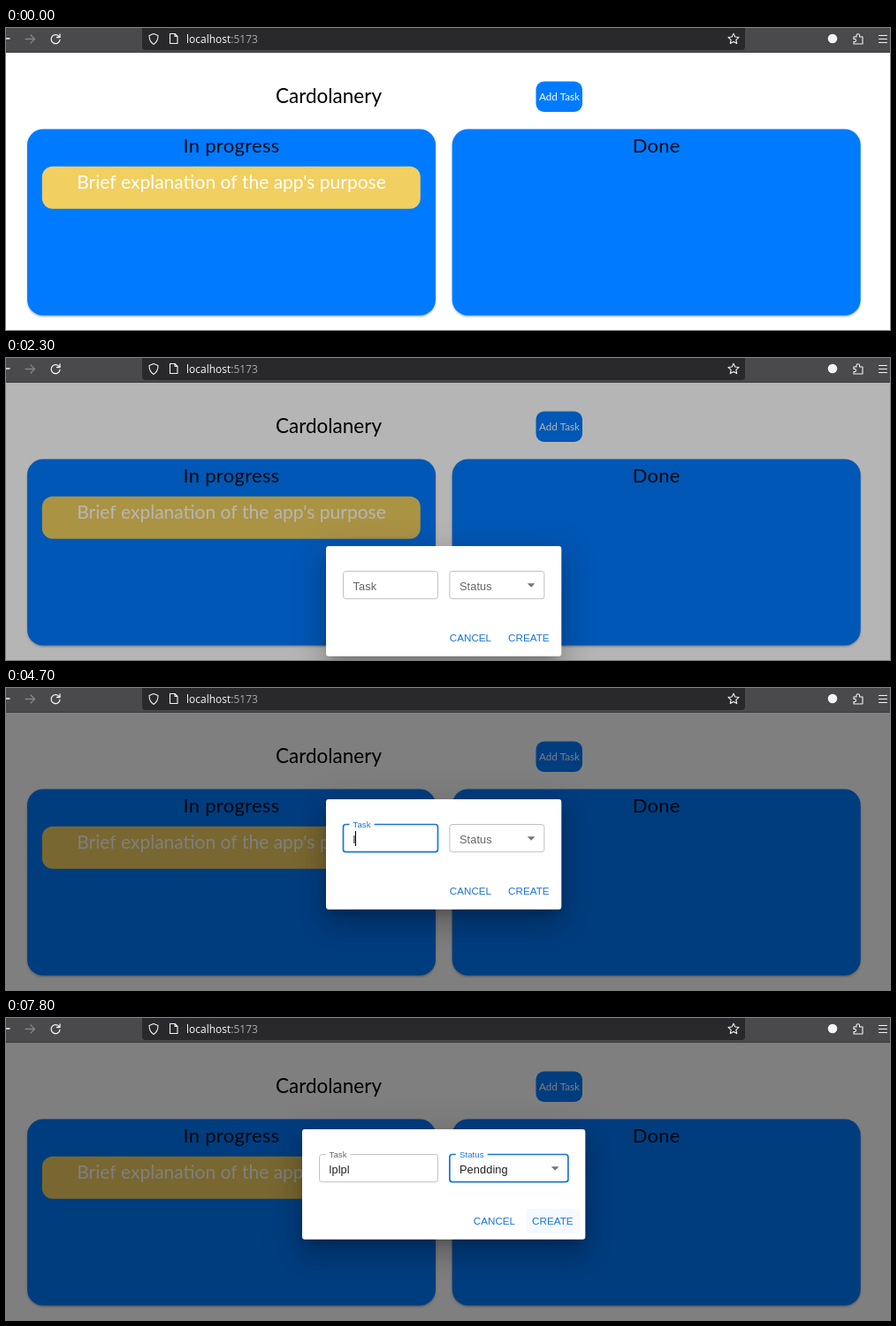
An HTML page with a canvas that plays this animation: 1000 by 342 pixels, repeating every 8000 ms.

```html
<!DOCTYPE html>
<html lang="en">
<head>
<meta charset="utf-8">
<title>Task board</title>
<style>
html, body { margin: 0; width: 100%; height: 100%; overflow: hidden; background: #fff; }
canvas { display: block; }
</style>
</head>
<body>
<canvas id="stage" width="1000" height="342"></canvas>
<script>
const ctx = document.getElementById('stage').getContext('2d');
const LOOP = 8000, STEP = 100;
const SCRIPT = 'Lato, sans-serif';
const UI = '"Liberation Sans", Arial, sans-serif';
const BLUE = '#007bff', ACCENT = '#1976d2', GREY = '#666', INK = '#212121';
const KEY_TIMES = [4700, 4900, 5100, 5200, 5400];
const TYPED = 'lplpl';
const OPTIONS = ['Pendding', 'In progress', 'Done'];

const clamp = v => Math.max(0, Math.min(1, v));
const smooth = v => { v = clamp(v); return v * v * (3 - 2 * v); };
const mix = (a, b, p) => a + (b - a) * p;
const between = (t, a, b) => t >= a && t < b;

function text(str, x, y, size, family, color, align = 'left', spacing = 0) {
  ctx.font = `${size}px ${family}`;
  ctx.letterSpacing = `${spacing}px`;
  ctx.textAlign = align;
  ctx.fillStyle = color;
  ctx.fillText(str, x, y);
}

function box(x, y, w, h, r, color) {
  ctx.fillStyle = color;
  ctx.beginPath();
  ctx.roundRect(x, y, w, h, r);
  ctx.fill();
}

// Each layer is [offset, blur, spread, alpha]; its caster sits off stage so only the shadow shows.
function shadowBox(x, y, w, h, r, color, layers) {
  const away = 2000;
  for (const [dy, blur, spread, alpha] of layers) {
    ctx.save();
    ctx.shadowColor = `rgba(0,0,0,${alpha})`;
    ctx.shadowBlur = blur;
    ctx.shadowOffsetX = away * ctx.getTransform().a;
    ctx.shadowOffsetY = dy;
    box(x - spread - away, y - spread, w + 2 * spread, h + 2 * spread, r, '#000');
    ctx.restore();
  }
  box(x, y, w, h, r, color);
}

function line(path, color, width = 1.3, x = 0, y = 0) {
  ctx.save();
  ctx.translate(x, y);
  ctx.strokeStyle = color;
  ctx.lineWidth = width;
  ctx.lineJoin = ctx.lineCap = 'round';
  ctx.stroke(new Path2D(path));
  ctx.restore();
}

function starPath(r) {
  let d = '';
  for (let i = 0; i < 10; i++) {
    const a = i * Math.PI / 5 - Math.PI / 2, q = i % 2 ? r * 0.48 : r;
    d += `${i ? 'L' : 'M'}${q * Math.cos(a)} ${q * Math.sin(a)}`;
  }
  return d + 'Z';
}

function drawBrowserBar() {
  const light = '#f4f4f6';
  box(0, 0, 1000, 28, 0, '#4a494c');
  box(0, 27, 1000, 1, 0, '#39383b');
  box(154, -6, 682, 31, 4, '#29282b');
  line('M-5 12H4', light);
  line('M22 12.5H32M28 8L32.5 12.5L28 17', '#858487');
  line('M60.3 10A5 5 0 1 0 61 13.5M61 7V10.5H57.5', light);
  line('M167 6.5L172 8.5C172 13 171 16 167 18.5C163 16 162 13 162 8.5Z', light, 1.1);
  line('M185.5 6.5H191L194 9.5V17.5H185.5ZM191 6.5V9.5H194', light, 1.1);
  text('localhost', 204, 17, 12, '"Open Sans", sans-serif', '#fbfbfe');
  text(':5173', 254.3, 17, 12, '"Open Sans", sans-serif', '#aaa9ad');
  line(starPath(6.3), light, 1.1, 823, 12.5);
  ctx.fillStyle = light;
  ctx.beginPath();
  ctx.arc(935, 12, 5.3, 0, 7);
  ctx.fill();
  line('M959 10H962V8.5A1.8 1.8 0 0 1 965.6 8.5V10H969V18H959V15.5H960.5A1.6 1.6 0 0 0 960.5 12.5H959Z', light, 1.1);
  line('M987.5 8.5H996.5M987.5 12.5H996.5M987.5 16.5H996.5', light, 1);
}

function drawColumn(x, title) {
  shadowBox(x, 114.5, 462, 211, 18, BLUE, [[1.5, 2.5, 0, 0.28]]);
  text(title, x + 231, 141, 22, SCRIPT, '#050a12', 'center', 0.3);
}

function drawBoard() {
  box(0, 28, 1000, 314, 0, '#fff');
  text('Cardolanery', 365, 84.5, 22.5, SCRIPT, '#000', 'center');
  box(599.5, 60.5, 52.5, 34.5, 9, BLUE);
  text('Add Task', 626, 82, 11.6, SCRIPT, '#fff', 'center');
  drawColumn(24, 'In progress');
  drawColumn(504.7, 'Done');
  box(40.8, 156.8, 428, 48, 12, '#f1cf60');
  text("Brief explanation of the app's purpose", 255, 181.5, 21, SCRIPT, '#fff', 'center');
}

function drawField({ x, y, w, label, value, shrink, focused, hovered }) {
  const size = mix(12.8, 9.6, shrink);
  ctx.beginPath();
  ctx.roundRect(x + 0.5, y + 28.5, w - 1, 31.2, 3);
  ctx.lineWidth = focused ? 1.7 : 1;
  ctx.strokeStyle = focused ? ACCENT : hovered ? INK : '#c1c1c1';
  ctx.stroke();
  if (shrink > 0) {
    ctx.font = `9.6px ${UI}`;
    ctx.letterSpacing = '0.1px';
    const notch = (ctx.measureText(label).width + 8) * shrink;
    box(x + 7.5, y + 27, notch, 4, 0, '#fff');
  }
  text(label, x + 11.5, mix(y + 49.5, y + 32, shrink), size, UI, focused ? ACCENT : GREY, 'left', 0.1);
  text(value, x + 11.5, y + 49.5, 12.8, UI, INK, 'left', 0.1);
}

function drawArrow(x, y, flip) {
  const s = flip ? -1 : 1;
  ctx.fillStyle = '#757575';
  ctx.beginPath();
  ctx.moveTo(x - 4.3, y - 2.2 * s);
  ctx.lineTo(x + 4.3, y - 2.2 * s);
  ctx.lineTo(x, y + 2.2 * s);
  ctx.fill();
}

function drawMenu(t) {
  const grow = smooth((t - 6350) / 225), fade = 1 - clamp((t - 7050) / 200);
  if (t < 6400 || fade <= 0) return;
  const x = 502, y = 186, w = 108, row = 28.8, pad = 6.4;
  ctx.save();
  ctx.globalAlpha = grow * fade;
  ctx.translate(x + w / 2, y);
  ctx.scale(mix(0.75, 1, grow), mix(0.56, 1, grow));
  ctx.translate(-x - w / 2, -y);
  shadowBox(x, y, w, row * 3 + pad * 2, 3, '#fff', [[4, 4, -2, 0.2], [6.4, 8, 0.8, 0.14], [2.4, 11, 1.6, 0.12]]);
  box(x, y + pad, w, row, 0, t < 6800 ? '#e0e0e0' : '#f0f0f0');
  OPTIONS.forEach((name, i) =>
    text(name, x + 12.8, y + pad + row * i + 19, 12.8, UI, INK, 'left', 0.1));
  ctx.restore();
}

function drawDialog(t) {
  if (t < 2300) return;
  const y = Math.round(126 + 87 * Math.exp(-2.67 * (t - 2300) / 100));
  const chosen = t >= 7100;
  const left = chosen ? 335 : 362, right = chosen ? 655.3 : 628.3;
  const fieldW = chosen ? 135 : 108;
  const taskX = left + 19;
  const statusX = taskX + fieldW + 12.4;

  shadowBox(left, y, right - left, 124.7, 3, '#fff',
    [[9, 12, -5.6, 0.2], [19, 30, 2.4, 0.14], [7, 37, 6.4, 0.12]]);

  const value = TYPED.slice(0, KEY_TIMES.filter(k => t >= k).length);
  drawField({
    x: taskX, y, w: fieldW, label: 'Task', value,
    shrink: smooth((t - 3050) / 200),
    focused: between(t, 3100, 6400),
    hovered: between(t, 2900, 3100)
  });
  const caretOn = between(t, 3200, 3700) || between(t, 4300, 5500);
  if (caretOn) {
    const caretX = taskX + 11.5 + ctx.measureText(value).width;
    box(Math.round(caretX), y + 36, 1, 17, 0, '#000');
  }

  drawField({
    x: statusX, y, w: fieldW, label: 'Status', value: chosen ? OPTIONS[0] : '',
    shrink: smooth((t - 6350) / 200),
    focused: t >= 6400,
    hovered: between(t, 2800, 2900) || between(t, 5900, 6400)
  });
  drawArrow(statusX + fieldW - 15.3, y + 44.5, between(t, 6400, 7100));

  if (t >= 7600) box(right - 66.3, y + 90, 60, 28, 3, '#f6f9fd');
  text('CANCEL', right - 126.6, y + 108, 11.7, UI, ACCENT);
  text('CREATE', right - 60.2, y + 108, 11.7, UI, ACCENT);
  drawMenu(t);
}

function draw(t) {
  ctx.clearRect(0, 0, 1000, 342);
  drawBoard();
  box(0, 28, 1000, 314, 0, `rgba(0,0,0,${0.5 * smooth((t - 2175) / 225)})`);
  drawDialog(t);
  drawBrowserBar();
}

const start = performance.now();
function frame() {
  const t = (performance.now() - start) % LOOP;
  draw(Math.floor(t / STEP) * STEP);
  requestAnimationFrame(frame);
}
draw(0);
requestAnimationFrame(frame);
</script>
</body>
</html>
```
